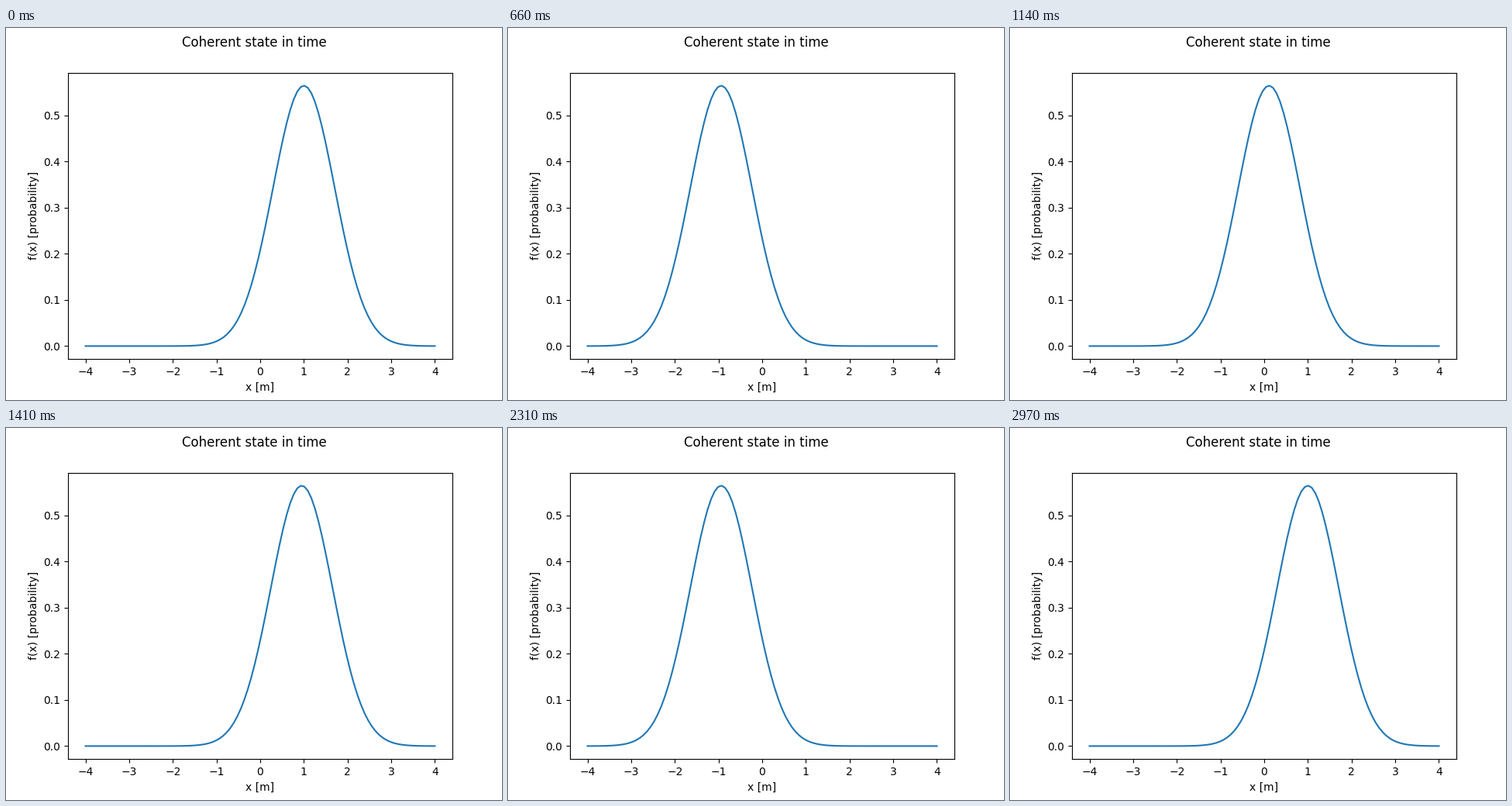
These frames come from a looping animation (640x480 px, 3000 ms). A matplotlib script:

```python
import numpy as np
import matplotlib.pyplot as plt
from matplotlib.animation import FuncAnimation

FRAMES = 100
INTERVAL = 30  # ms

x = np.linspace(-4, 4, 100)
phase = np.linspace(0, 4 * np.pi, FRAMES)  # two full oscillations


def density(i):
    """Gaussian packet whose centre swings harmonically between -1 and 1."""
    return np.exp(-(x - np.cos(phase[i])) ** 2) / np.sqrt(np.pi)


fig, ax = plt.subplots(figsize=(6.4, 4.8), dpi=100)
fig.suptitle("Coherent state in time")
ax.set_xlabel("x [m]")
ax.set_ylabel("f(x) [probability]")
line, = ax.plot(x, density(0), color="tab:blue", lw=1.5)


def update(i):
    line.set_ydata(density(i))
    return line,


anim = FuncAnimation(fig, update, frames=FRAMES, interval=INTERVAL,
                     repeat=True, repeat_delay=0)
plt.show()
```
